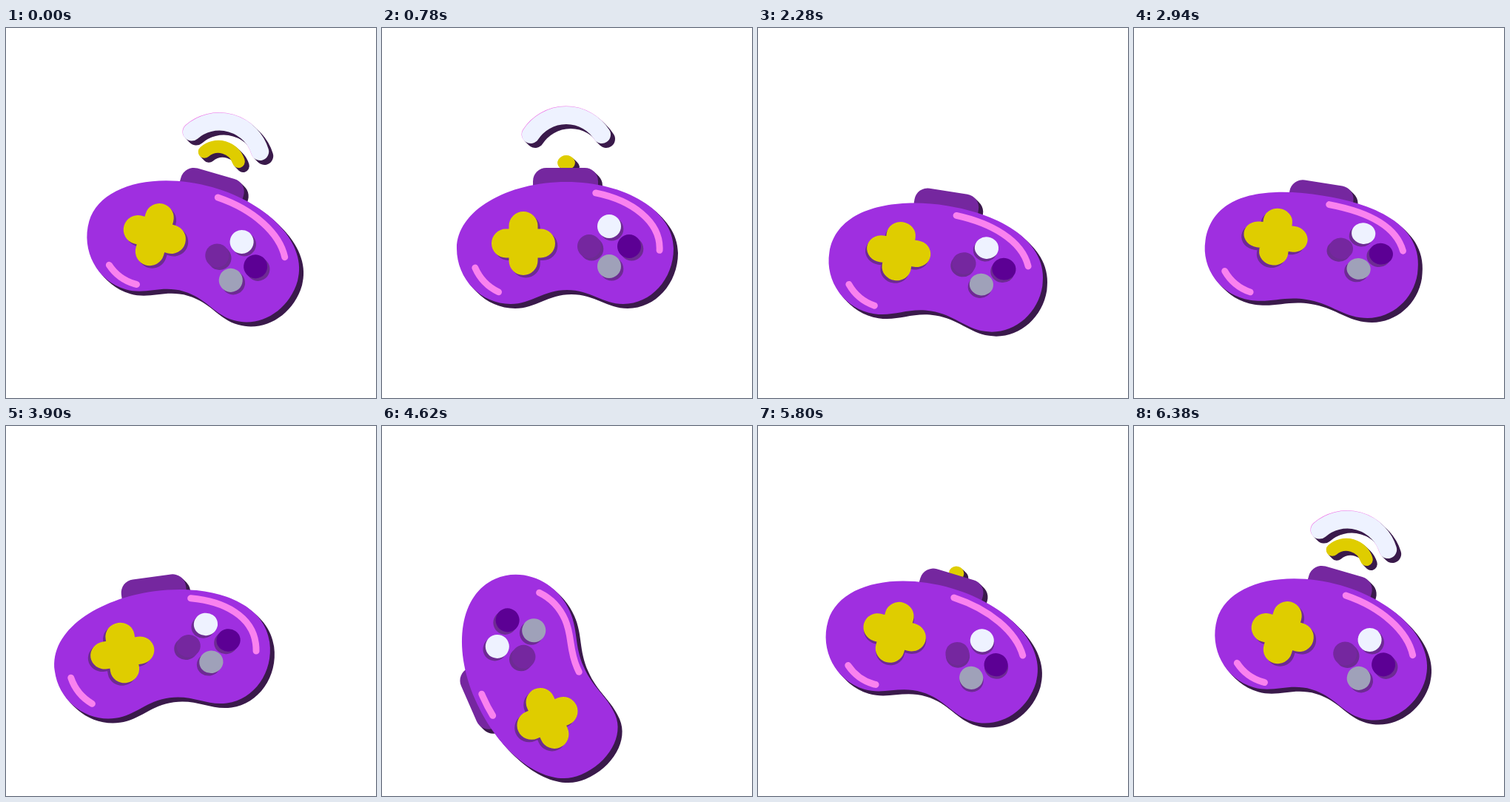
Recreate the animation shown at these times as an HTML page. Size 500 px wide and 500 px high, loop 6400 ms.

```html
<!DOCTYPE html>
<html lang="en">
<head>
<meta charset="utf-8">
<title>Game controller</title>
<style>
  html, body { margin: 0; width: 100%; height: 100%; overflow: hidden; background: #fff; }
  svg { display: block; width: 100%; height: 100%; }
</style>
</head>
<body>
<svg viewBox="0 0 500 500">
  <defs>
    <path id="body" pathLength="100"/>
    <rect id="antenna" x="-45" width="88" rx="18"/>
    <path id="smallWave" fill="none" stroke-width="17" stroke-linecap="round"/>
    <path id="bigWave" fill="none" stroke-width="24" stroke-linecap="round"/>
  </defs>
  <g id="solids"></g>
  <g id="shine" fill="none" stroke="#fa82ef" stroke-width="10.3" stroke-linecap="round">
    <path id="longShine" pathLength="100"/>
    <path id="shortShine" pathLength="100"/>
  </g>
  <g id="keyShade"></g>
  <g id="keys"></g>
</svg>
<script>
const LOOP = 6400;
const SHADE = '#3a1a4b', PURPLE = '#9f2fe0', PLUM = '#75279f', YELLOW = '#dfcd00',
      WHITE = '#eef2ff', KEY_SHADE = '#6d2b93';
const el = id => document.getElementById(id);
const mix = (a, b, u) => a + (b - a) * u;
const ease = (t, from, to) => {
  const u = Math.min(1, Math.max(0, (t - from) / (to - from)));
  return u * u * (3 - 2 * u);
};

// Key poses: time, x, y, turn, size, lift (tilt towards the viewer), sway (lobes pulled by the spin)
const lean = [212, 306, -10, 1, .3, 0];
const poses = [
  [0, 256, 297, 16, 1, 0, 0],
  [780, 249, 293, 0, 1, 0, 0],
  [1680, 256, 299, 0, 1.25, 0, 0],
  [1990, 243, 326, 9, 1, .3, 0],
  [2940, 242, 305, 9, .99, .6, 0],
  [3320, ...lean],
  [3850, ...lean],
  [4620, 204, 336, 246, 1, 0, 1],
  [5160, 234, 307, 387, 1, 1, 0],
  [5900, 239, 300, 376, 1, .1, 0],
  [LOOP, 256, 297, 376, 1, 0, 0]
];

// Monotone cubic interpolation between the key poses.
function poseAt(t) {
  const slope = (i, c) => (poses[i + 1][c] - poses[i][c]) / (poses[i + 1][0] - poses[i][0]);
  const tangent = (i, c) => {
    if (i === 0 || i === poses.length - 1) return 0;
    const a = slope(i - 1, c), b = slope(i, c);
    return a * b <= 0 ? 0 : 2 * a * b / (a + b);
  };
  let i = 0;
  while (i < poses.length - 2 && t >= poses[i + 1][0]) i++;
  const span = poses[i + 1][0] - poses[i][0];
  const u = (t - poses[i][0]) / span, v = 1 - u;
  return poses[i].map((from, c) =>
    mix(from, poses[i + 1][c], u * u * (3 - 2 * u))
    + span * u * v * (tangent(i, c) * v - tangent(i + 1, c) * u)).slice(1);
}

// Bean outline, clockwise from the top; bending flattens the belly and dents the top.
function outline(bend, sway) {
  const top = mix(-85, -72, bend), crown = mix(80, 40, bend), shoulder = mix(-46, -102, bend);
  const lobe = mix(80, 69, bend), dip = mix(61, 67, Math.max(bend, sway)), low = mix(5, lobe, .55);
  const right = 145 - 6 * sway, left = -148 - 2 * sway, mid = 1 - 19 * sway;
  const lobeR = mid + 76, lobeL = mid - 76;
  return `M0 ${top}C${crown} ${top} ${right} ${shoulder} ${right} 5`
    + `C${right} ${low} ${mix(lobeR, right, .55)} ${lobe} ${lobeR} ${lobe}`
    + `C${lobeR - 28} ${lobe} ${mid + 32} ${dip} ${mid} ${dip}`
    + `S${lobeL + 28} ${lobe} ${lobeL} ${lobe}`
    + `C${mix(lobeL, left, .55)} ${lobe} ${left} ${low} ${left} 5`
    + `C${left} ${shoulder} ${-crown} ${top} 0 ${top}Z`;
}

// A wave leaves the antenna as a dot and opens into an arc.
function setWave(id, grown, height, reach) {
  const y = mix(-75, -height, grown), h = Math.max(.01, reach * grown ** 5);
  const sag = h * .54, r = (h * h + sag * sag) / (2 * sag);
  el(id).setAttribute('d', grown ? `M${-h} ${y}A${r} ${r} 0 0 1 ${h} ${y}` : '');
}

// A highlight covers a stretch of the inset outline, in percent of its length.
function setShine(id, d, from, length) {
  const path = el(id);
  path.setAttribute('d', d);
  path.setAttribute('stroke-dasharray', `${length} ${100 - length}`);
  path.setAttribute('stroke-dashoffset', -((from % 100) + 100) % 100);
}

function solid(id, color, paint) {
  const use = (shift, c) => `<use href="#${id}" ${paint}="${c}" transform="translate(${shift} ${shift})"/>`;
  return use(6, SHADE) + use(4, SHADE) + use(2, SHADE) + use(0, color);
}

function keys(pad, top, right, bottom, left) {
  const button = (x, y, c) => `<circle cx="${x}" cy="${y}" r="16" fill="${c}"/>`;
  return `<path d="M-81.5-2h47M-58-25.5v47" stroke="${pad}" stroke-width="39" stroke-linecap="round"/>`
    + button(58, -25, top) + button(85, 2, right) + button(58, 29, bottom) + button(31, 2, left);
}

el('solids').innerHTML =
  '<use href="#bigWave" stroke="#ec6ee6" transform="translate(-.4 -.5)"/>' +
  solid('bigWave', WHITE, 'stroke') + solid('smallWave', YELLOW, 'stroke') +
  solid('antenna', PLUM, 'fill') + solid('body', PURPLE, 'fill');
el('keyShade').innerHTML = keys(...Array(5).fill(KEY_SHADE));
el('keys').innerHTML = keys(YELLOW, WHITE, '#5c0094', '#9fa1b9', PLUM);

function draw(t) {
  const [x, y, turn, size, lift, sway] = poseAt(t);
  const place = `translate(${x} ${y}) rotate(${turn}) scale(${size})`;
  for (const id of ['body', 'antenna', 'smallWave', 'bigWave']) el(id).setAttribute('transform', place);

  const shape = outline(lift * lift, sway);
  el('body').setAttribute('d', shape);

  const drop = 50 * lift ** 4 + 9 * sway;
  el('antenna').setAttribute('y', -104 + drop);
  el('antenna').setAttribute('height', 56 - drop / 2);
  setWave('smallWave', 1 - ease(t, 560, 1140) + ease(t, 5550, 6000), 128, 24);
  setWave('bigWave', 1 - ease(t, 1200, 1600) + ease(t, 5750, 6200), 149, 48);

  // The light stays put, so highlights slide back as the body turns.
  const slide = turn / 3.6;
  el('shine').setAttribute('transform', `${place} scale(.87)`);
  setShine('longShine', shape, 6 - slide - 3 * lift - 5 * sway, 19);
  setShine('shortShine', shape, 64 - slide, 7 - 2 * sway);

  // The raised keys shift and flatten with the tilt.
  const light = 1 - 2 * ease(t, 1700, 2500) + 2 * ease(t, 5200, 6300);
  const keyPlace = `translate(${x + 12 * lift - 2 * sway} ${y - 22 * lift + 5 * sway}) `
    + `rotate(${turn - 2 * lift}) scale(${size * (1 + .03 * lift)} ${size * (1 - .16 * lift)})`;
  el('keys').setAttribute('transform', keyPlace);
  el('keyShade').setAttribute('transform', `translate(${3.3 * light} 3.5) ${keyPlace}`);
}

const start = performance.now();
function tick() {
  draw((performance.now() - start) % LOOP);
  requestAnimationFrame(tick);
}
tick();
</script>
</body>
</html>
```
